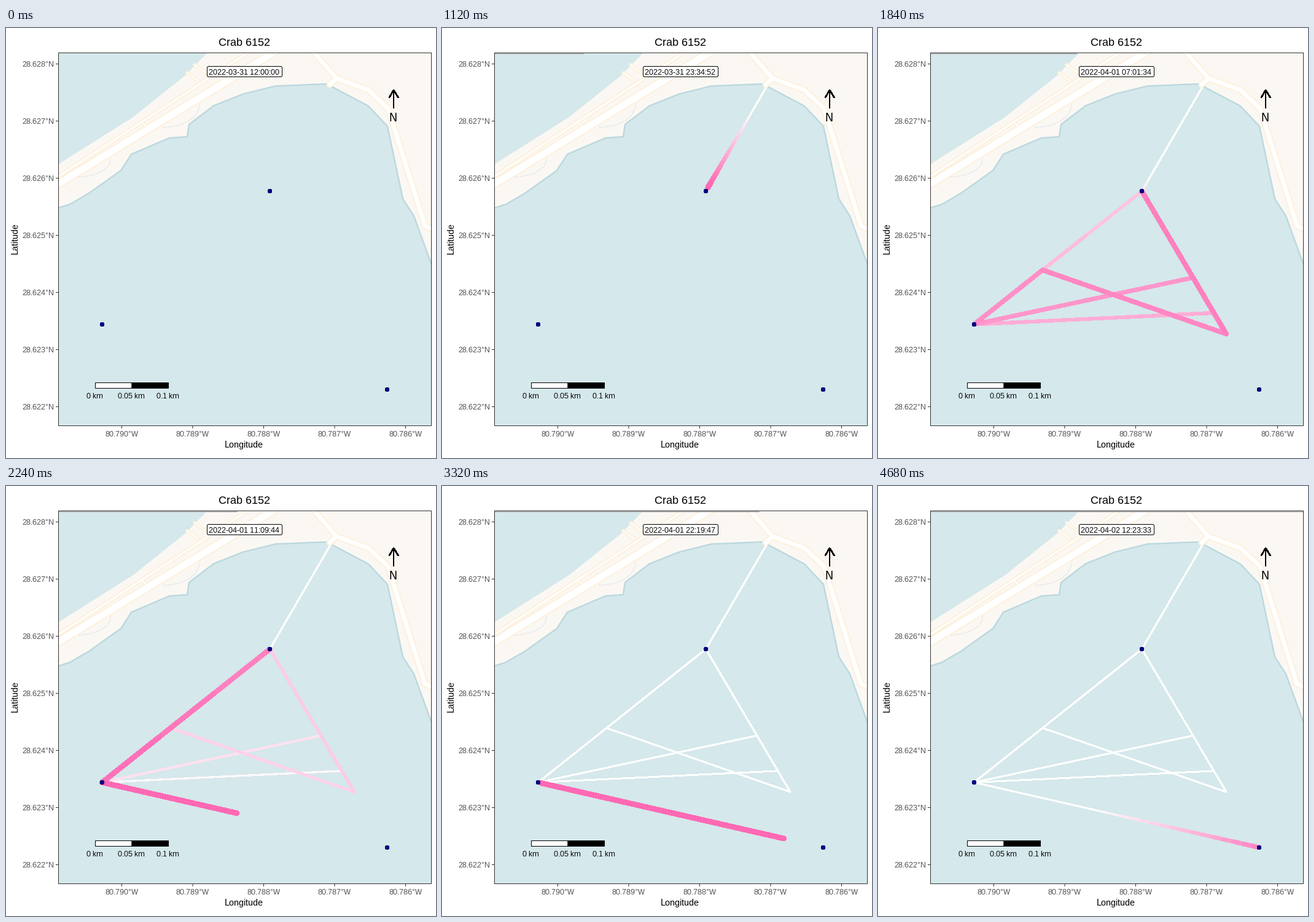
Write a matplotlib script that moves like this. It is 700x700 px and loops after 4.72 s.

```python
import numpy as np
import matplotlib.pyplot as plt
from matplotlib.animation import FuncAnimation
from matplotlib.collections import LineCollection
from matplotlib.patches import Circle, FancyBboxPatch, Polygon, Rectangle

plt.rcParams.update({"font.family": "Liberation Sans", "path.snap": False,
                     "text.hinting": "native", "text.hinting_factor": 1})

FRAMES, INTERVAL = 118, 40
SIZE, DPI = 700, 100
PT = 72 / DPI  # points per pixel
LEFT, TOP, RIGHT, BOTTOM = 85.5, 40.5, 692.5, 647.5

WATER, LAND, SHORE = "#d5e8eb", "#fbf8f3", "#bcd8df"
CASING, FOOTPATH, GREY = "#fdf1dc", "#dfe4ea", "#4d4d4d"
PINK, WHITE = np.array([255, 105, 180]) / 255, np.ones(3)
WAKE, THICK, THIN = 20, 8, 2  # wake length in frames, widths in pixels

fig = plt.figure(figsize=(SIZE / DPI, SIZE / DPI), dpi=DPI, facecolor="white")
ax = fig.add_axes([0, 0, 1, 1])
ax.set_xlim(0, SIZE)
ax.set_ylim(SIZE, 0)
ax.axis("off")


def mix(p, q, t):
    return p + (q - p) * t


def box(x, y, w, h, z, **kw):
    return ax.add_patch(Rectangle((x, y), w, h, lw=PT, zorder=z, **kw))


def line(points, color, width, z, cap="round", **kw):
    (item,) = ax.plot(*zip(*points), color=color, lw=width * PT, zorder=z,
                      solid_capstyle=cap, solid_joinstyle="round", **kw)
    item.set_clip_path(panel if z < 5 else None)


def text(x, y, s, size=12, color="black", ha="center", va="baseline", **kw):
    return ax.text(x, y, s, fontsize=size * PT, color=color, ha=ha, va=va, zorder=12, **kw)


def bezier(p, q, r):
    p, q, r = map(np.array, (p, q, r))
    return [mix(mix(p, q, t), mix(q, r, t), t) for t in np.linspace(0, 1, 20)]


# Base map
panel = box(LEFT, TOP, RIGHT - LEFT, BOTTOM - TOP, 0, fc=WATER, ec="none")
coast = [(85, 293), (104, 287), (135, 269), (187, 232), (204, 205.5), (266, 179),
         (295, 177), (298, 157), (338, 126.5), (386, 107.5), (438, 94.5), (522, 91),
         (590, 127), (621, 160), (646, 278), (664, 306), (692, 383)]
lagoon = [(85, 222), (207, 145), (292, 77), (328, 40)]
land = ax.add_patch(Polygon(lagoon + [(693, 40)] + coast[::-1], fc=LAND, ec="none", zorder=1))
land.set_clip_path(panel)
line(coast, SHORE, 2.4, 2)

roads = [([(80, 245), (400, 36)], 3),
         ([(80, 257), (442, 36)], 11),
         ([(498, 36), (538, 82), (527, 92)], 7),
         ([(538, 82), (590, 101), (622, 131), (682, 322), (696, 328)], 7)]
roads += [([(x, y), (x + 18, y + 13)], 2) for x, y in ((219, 153), (295, 73), (307, 60))]
for z, color, extra in ((3, CASING, 4), (4, "white", 0)):
    for pts, w in roads:
        line(pts, color, w + extra, z)
for ends in (((119, 243), (170, 238), (170, 212)), ((256, 162), (312, 158), (315, 124))):
    line(bezier(*ends), FOOTPATH, 2, 4, linestyle=(0, (1, 1)))

# Frame, ticks and labels
box(LEFT, TOP, RIGHT - LEFT, BOTTOM - TOP, 10, fill=False, ec="#333333")
for i in range(7):
    y = 59 + 93 * i
    line([(81, y - 0.5), (LEFT, y - 0.5)], "#333333", 1, 9, "butt")
    text(78, y + 4, f"28.{628 - i}°N", color=GREY, ha="right")
for i in range(5):
    x = 188.5 + 115.5 * i
    line([(x, BOTTOM), (x, 652)], "#333333", 1, 9, "butt")
    text(x - 0.5, 665, f"80.{790 - i}°W", color=GREY)
text(388, 29, "Crab 6152", 18)
text(387.5, 683, "Longitude", 15)
text(15, 343, "Latitude", 15, rotation=90, va="center")

# Scale bar and north arrow
for i, color in enumerate(("white", "black")):
    x = 145.5 + 59.5 * i
    box(x, 577.5, 59.5, 9, 10, fc=color, ec="black")
    text(144.5 + 59.5 * i, 603, ("0 km", "0.05 km")[i])
text(263.5, 603, "0.1 km")
line([(631, 131), (631, 101)], "black", 2, 10, "butt", antialiased=False)
line([(624, 113), (631, 101), (638.5, 113)], "black", 1.5, 10, antialiased=False)
text(630.5, 152, "N", 20)

# Clock label
ax.add_patch(FancyBboxPatch((327.5, 62.5), 122, 17, boxstyle="round,pad=0,rounding_size=2.5",
                            fc="white", ec="black", lw=PT, zorder=11))
clock = text(330, 76, "", ha="left")

# Receivers
A, B, C = np.array([(429.5, 265.5), (156.5, 482.5), (620.5, 588.5)])
for p in (A, B, C):
    ax.add_patch(Circle(p, 3.5, fc="#000080", ec="none", zorder=8, antialiased=False))

# Route: -1 is the release point, then 0, 1, 2, 3 run round the triangle A-B-C-A.
CORNERS = np.array([(527.5, 97), A, B, C, A])
VISITS = {0: -1, 29: 0, 33: 0, 36: 1, 37: 2.386, 39: 2.564, 40: 1, 41: 0.592, 42: 2.28,
          43: 0, 52: 0, 55: 1, 56: 1.472, 57: 1.62, 82: 1.01, 83: 1.862, 85: 1, 112.5: 2}


def along(x, xs, points):
    return np.column_stack([np.interp(x, xs, axis) for axis in points.T])


stops = along(list(VISITS.values()), range(-1, 4), CORNERS)
track = along(np.arange(FRAMES), list(VISITS), stops)
steps = np.stack([track[:-1], track[1:]], axis=1)
moving = np.hypot(*(track[1:] - track[:-1]).T) > 0.01

wake = LineCollection([], capstyle="round", antialiaseds=False, zorder=6)
ax.add_collection(wake, autolim=False)
bar = box(86, 41, 0, 2, 9, fc="#bebebe", ec="none")

DAYS = ["2022-03-31", "2022-04-01", "2022-04-02"]


def stamp(n):
    day, s = divmod(12 * 3600 + 1489 * n, 86400)
    return f"{DAYS[day]} {s // 3600:02d}:{s // 60 % 60:02d}:{s % 60:02d}"


def draw(n):
    idx = np.flatnonzero(moving[:n])
    fade = np.clip((n - 1 - idx) / WAKE, 0, 1)
    wake.set_segments(list(steps[idx]))
    wake.set_linewidths(mix(THICK, THIN, fade) * PT)
    wake.set_color([tuple(mix(PINK, WHITE, f)) for f in fade])
    bar.set_width((RIGHT - LEFT) * n / (FRAMES - 1))
    clock.set_text(stamp(n))
    return wake, bar, clock


anim = FuncAnimation(fig, draw, frames=FRAMES, interval=INTERVAL, repeat=True,
                     repeat_delay=0, blit=False)
plt.show()
```
